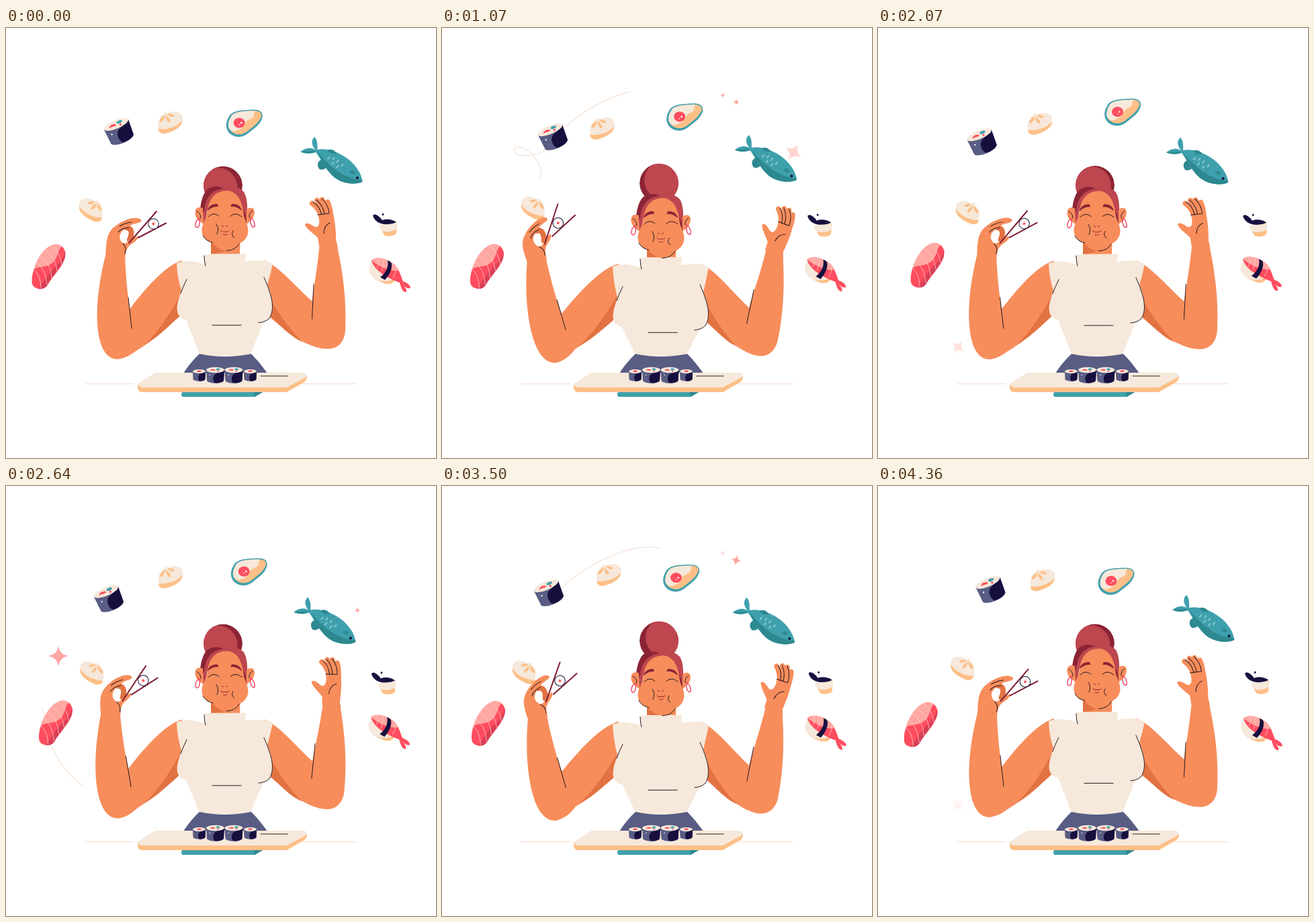
An HTML page that plays this animation: 640 by 640 pixels, repeating every 4.43 s.

```html
<!DOCTYPE html>
<html lang="en">
<head>
<meta charset="utf-8">
<title>Sushi time</title>
<style>
html, body { margin: 0; width: 100%; height: 100%; overflow: hidden; background: #fff; }
svg { display: block; width: 100vw; height: 100vh; }
.line { fill: none; stroke: #2a1a22; stroke-width: 1; stroke-linecap: round; }
.skin { fill: #f78d5b; }
.shade { fill: #e37242; }
.cream { fill: #f6e8da; }
.peach { fill: #fdbf87; }
.teal { fill: #3fa0ad; }
.deep { fill: #2d8890; }
.navy { fill: #17103f; }
.slate { fill: #595c83; }
.red { fill: #ff4d5f; }
.pink { fill: #ffa7a2; }
.hair { fill: #bd464f; }
.dark { fill: #8b2434; }
.stripe { fill: none; stroke: #ffc9c4; stroke-width: .8; }
.stick { fill: none; stroke: #7e1f33; stroke-width: 2; stroke-linecap: round; }
</style>
</head>
<body>
<svg viewBox="0 0 640 640">
  <defs>
    <g id="roll">
      <path class="slate" d="M-13.5,-8 L-12.5,8 C-9,13 9,13 12.5,8 L13.5,-8Z"/>
      <path class="navy" d="M13.5,-8 L12.5,8 C10,11 3,12 -1,11 C-4,8 -4,1 0,-2 C4,-4 9,-4 13.5,-8Z"/>
      <ellipse class="cream" cy="-8" rx="13.4" ry="4.2"/>
      <path class="red" d="M-8,-7 C-7,-10 -1,-10 0,-7.5 C-2,-6 -4,-8 -8,-7Z"/>
      <ellipse class="teal" cx="4" cy="-9" rx="3" ry="1.4"/>
      <circle class="red" cx="4" cy="-6.2" r="1.1"/>
      <circle cx="-8" cy="-.5" r=".8" fill="#fff"/>
    </g>
    <g id="mini">
      <path class="slate" d="M-9.5,-6 L-9,6 C-6,9.5 6,9.5 9,6 L9.5,-6Z"/>
      <path class="navy" d="M9.5,-6 L9,6 C7,8.5 3,9 0,8.5 C-2,5 -2,0 1,-2Z"/>
      <ellipse class="cream" cy="-6" rx="9.5" ry="3"/>
      <ellipse class="red" cy="-6.2" rx="3.2" ry="1.2"/>
    </g>
    <g id="dumpling">
      <path class="cream" d="M226,147 C225,137 229,129 234,128 L235,123.5 L240,126 C249,121 259,123 262,130 C264,142 251,152 240,155 C232,158 226,154 226,147Z"/>
      <path class="peach" d="M226,149 C238,151 255,146 262,136 C262,146 250,152 240,155 C232,158 226,155 226,149Z"/>
      <path class="peach" d="M236,128 C231,132 227,136 228,139 C233,139 236,134 236,128Z M237,129 C237,134 239,138 243,140 C246,137 242,132 237,129Z M239,127 C243,131 248,133 250,130 C248,127 243,126 239,127Z"/>
    </g>
    <path id="star" d="M0,-1 Q.13,-.13 1,0 Q.13,.13 0,1 Q-.13,.13 -1,0 Q-.13,-.13 0,-1Z"/>
    <clipPath id="bunEdge"><circle cx="323" cy="234" r="29"/></clipPath>
  </defs>

  <path id="trail" pathLength="680" fill="none" stroke="#f6e7dc" stroke-width="1.4"
    d="M117,448 C70,415 42,350 61,283 C66,268 72,259 79,253 C100,233 132,242 145,226 C152,214 144,198 132,186 C122,176 107,175 107,182 C107,192 135,193 152,183 C172,152 210,122 248,106 Q265,98 283,94 Q305,89 325,92 C347,94 370,103 384,117"/>

  <g id="salmon">
    <path class="red" d="M63,326 C75,318 90,324 87,341 C84,355 68,370 61,382 C56,391 41,390 38,381 C35,364 48,336 63,326Z"/>
    <path fill="#d93f56" d="M87,332 C90,348 70,366 61,382 C58,388 52,389 48,388 C55,378 62,366 70,358 C79,350 85,342 87,332Z"/>
    <path class="pink" d="M40,360 C46,340 58,325 70,322 C76,321 80,323 82,325 C74,332 78,348 60,354 C52,356 45,355 40,360Z"/>
    <path class="stripe" d="M40,359 Q51,368 51,388 M44,348 Q58,358 60,382 M50,339 Q66,349 67,372 M57,331 Q73,341 75,362 M66,324 Q80,334 82,352"/>
  </g>
  <g id="bunLow"><use href="#dumpling" transform="rotate(7,127,270) translate(371,130) scale(-1,1)"/></g>
  <g id="maki"><use href="#roll" transform="translate(169,154) rotate(-23) scale(1.45 1.5)"/></g>
  <g id="bunTop"><use href="#dumpling"/></g>
  <g id="egg">
    <path class="teal" d="M332,132 C336,123 350,122 365,121.500 C378,120.500 384,125 381.500,134 C378,145 368,150 360,157 C350,165 334,163 329,150 C327,143 329,137 332,132Z"/>
    <path class="peach" d="M335,132 C339,124 352,123.500 365,123 C377,122 382,126 380,132 C376,142 367,147 359,154 C350,161 337,159 332,149 C330,143 332,137 335,132Z"/>
    <path class="cream" d="M335,132 C339,124 352,123.500 371,123 C368,130 371,133 362,136 C354,140 356,148 347,151 C341,153 339,157 332,149 C330,143 332,137 335,132Z"/>
    <ellipse class="red" cx="347.500" cy="141" rx="8.500" ry="7.500"/>
    <circle cx="350.500" cy="141" r="1.300" fill="#fff"/><circle cx="347.500" cy="144" r=".8" fill="#fff"/>
  </g>
  <g id="fish">
    <path class="teal" d="M463,184 C455,177 452,168 459,162 C464,168 463,176 463,181 C475,178 495,184 510,196 C522,206 529,218 530,228 C520,234 500,232 488,222 C476,212 470,198 461,185 C452,188 443,187 438,184 C444,179 453,176 461,182Z"/>
    <path class="deep" d="M463,184 C480,206 505,226 530,226 L530,229 C520,234 500,232 488,222 C476,212 470,198 463,184Z M478,183 C480,179 488,180 492,187 L484,187Z M469,196 C463,198 462,205 466,210 C470,212 474,210 476,208Z M438,184 C446,183 454,183 461,183 C453,188 443,187 438,184Z M511,214 C514,210 519,212 520,217 C516,218 512,217 511,214Z"/>
    <path fill="none" stroke="#8cc9cd" stroke-width="1.800" d="M478,194 q3,1 3,-3 M485,195 q3,1 3,-3 M484,202 q3,1 3,-3 M491,199 q3,1 3,-3 M491,207 q3,1 3,-3 M498,205 q3,1 3,-3"/>
    <circle class="navy" cx="522.500" cy="223" r="2"/>
  </g>
  <g id="soy">
    <path class="peach" d="M556,296 L582,290 L581,306 C576,311 566,310 563,308Z"/>
    <path class="cream" d="M555,294 L581,287 L582,299 C574,304 566,304 559,302Z"/>
    <path class="navy" d="M546,279 C549,275 555,279 560,286 C566,283 577,285 581,289 C573,293 551,296 546,279Z M559.500,277 Q562,274 562.500,278 Q561,281 559.500,277Z"/>
  </g>
  <g id="shrimp">
    <path class="cream" d="M541,355 C538,368 552,379 565,380 C576,382 581,376 578,370 L545,346Z"/>
    <path class="peach" d="M552,374 C560,378 570,378 579,373 C578,381 570,382 563,380Z"/>
    <path class="red" d="M544,346 C551,339 567,343 578,352 C586,359 588,371 591,377 C597,379 602,383 602,387 C597,389 593,384 590,382 C594,385 597,390 596,393 C590,394 588,386 586,379 C572,374 548,362 544,346Z"/>
    <path class="pink" d="M544,346 C551,339 567,343 578,352 C581,355 583,358 584,361 C573,363 557,356 544,346Z"/>
    <path class="stripe" d="M553,343 Q556,351 552,357 M562,344 Q563,353 559,362 M581,356 Q581,365 576,372"/>
    <path class="navy" d="M568,346 C571,347 573,348 574,351 C575,361 569,369 564,375 L557,371 C565,365 570,356 568,346Z"/>
  </g>
  <g id="stars" class="pink"></g>

  <path stroke="#f9e9e0" stroke-width="2" d="M118,529.500H190M440,529.500H522"/>

  <g id="armL">
    <path class="skin" d="M262,346 C238,353 210,384 182,421 L150,455 L165,493 C180,491 198,478 214,467 L268,418Z"/>
    <path class="shade" d="M266,385 C250,415 232,447 207,471 C224,462 240,446 264,424Z"/>
    <g id="foreL">
      <path class="skin" d="M149,335 C141,365 134,405 136,440 C138,473 148,493 166,493 C180,491 188,485 196,478 L187,430 C181,405 178,365 177,335Z"/>
      <path class="line" d="M182,401L187,447"/>
      <g id="handL">
        <path fill="none" stroke="#e37242" stroke-width="8" stroke-linecap="round" d="M179,297 C188,298 188,306 184,315"/>
        <path class="skin" d="M148.500,340 C149,318 150,306 160,297 C170,288 186,281 196,283 C203,284 203,289 197,290 C188,292 185,293 179,298 C170,303 167,310 171,317 C174,322 179,321 183,317 C188,314 193,310 197,310 C197,315 191,319 186,322 C181,326 178,331 177.500,341 C168,345 156,345 148.500,340Z"/>
        <path class="line" d="M169,295Q177,290 187,289M167,304Q173,297 183,297M174,321Q180,326 177,336"/>
        <path class="stick" d="M183,320L224,273"/>
        <path id="stick" class="stick" d="M197,312L238,290.500"/>
        <g id="bite">
          <circle cx="219.500" cy="291.500" r="7.800" fill="#fffaf5" stroke="#17103f" stroke-width="1"/>
          <circle class="red" cx="219.500" cy="291.500" r="1.900"/>
        </g>
      </g>
    </g>
  </g>
  <g id="armR">
    <path class="skin" d="M385,346 C408,356 432,386 456,407 L490,455 L475,477 C462,477 445,469 430,461 L380,420Z"/>
    <path class="shade" d="M385,388 C402,420 420,446 441,467 C424,460 408,443 388,424Z"/>
    <g id="foreR">
      <path class="skin" d="M467,318 C464,355 458,385 455,410 L445,468 C455,473 466,477 476,477.500 C495,479 504,466 505,450 C507,405 502,365 491,316Z"/>
      <path class="shade" d="M489,308 L494,328 L489,318Z"/>
      <path class="line" d="M458,381L455.500,433"/>
      <g id="handR">
        <path class="skin" d="M466,324 L464,312 C458,306 447,299 445,293 C446,289 451,291 455,293 C460,297 465,298 466,291 C467,286 465,280 463,274 L482,264 C488,276 491,290 491.500,322 C483,326 473,326 466,324Z"/>
        <path fill="none" stroke="#f78d5b" stroke-width="7.500" stroke-linecap="round" stroke-linejoin="round" d="M472,286Q466,268 455.500,261M474,282Q470,264 463,256.500M478,280Q475,264 470.500,255.500M484,284Q483,268 478.500,259"/>
        <path class="line" d="M457,259Q466,264 470,278M462,256Q472,264 474,277M470,254Q479,262 481,275M464,278Q472,277 481,276M473,306Q473,294 482,290"/>
      </g>
    </g>
  </g>

  <path id="neck" class="skin"/>
  <path id="neckShade" class="shade"/>
  <path id="torso" class="cream"/>
  <g id="bun" clip-path="url(#bunEdge)">
    <circle class="dark" cx="323" cy="234" r="29"/>
    <circle id="bunLight" class="hair" cx="323" cy="234" r="29"/>
  </g>
  <g id="head">
    <path class="hair" d="M289,284 C288,262 293,247 301,241 C318,232 345,233 354,244 C360,254 360,270 358,298 C352,290 352,280 350,270 L300,270 L296,292Z"/>
    <path class="dark" d="M289,282 C288,262 293,246 300,240 C308,235 317,235 324,239 C306,240 296,254 295,272 Z M349,268 C355,270 358,280 358,298 C354,292 352,280 349,268Z"/>
    <path class="skin" d="M293,268 C281,263 278,276 286,286 L294,292Z M358,270 C369,262 374,274 366,285 L358,292Z"/>
    <path class="skin" d="M300,272 C302,251 314,242 330,242 C345,244 352,258 354,280 C357,289 362,297 360,306 C358,315 351,319 347,321 C343,328 337,331 328,331.500 C318,331 311,324 306,319 C297,318 291,309 291.500,300 C292,290 299,284 300,272Z"/>
    <path class="line" d="M284,273Q290,275 290,283M367,272Q361,275 362,282"/>
    <path fill="none" stroke="#f04463" stroke-width="1.400" d="M288,283C282,286 280,295 284,297C288,297 289,290 288,283M364,282C369,285 372,294 369,296.500C365,296 363,290 364,282"/>
    <path class="dark" d="M300,272 C301,265 308,261 315,262 L316,266 C310,265 305,268 300,272Z M351,272 C350,265 343,261 336,262 L334,266 C341,265 346,268 351,272Z"/>
    <path class="line" d="M301,281Q309,273 317,280M334,280Q342,273 351,281M313,292Q318,299 314,307M338,302Q334,308 340,312M293,309Q297,317 308,319.500M328,331.500Q342,331 347,321"/>
    <path fill="none" stroke="#a33438" stroke-width="1.100" stroke-linecap="round" d="M321.500,294q1,1.500 2,1M329.500,294q-1,1.500 -2,1M320,301.500Q322,304 326,303Q330,304 332,301.500M323,307Q326,308.500 329,307"/>
  </g>
  <path id="collar" class="line"/>
  <path id="folds" class="line" d="M269,374Q263,386 260,395M384,371Q390,384 394,398C398,413 397,424 392,432Q386,438 376,438.500M307,442.300H350"/>

  <path class="slate" d="M288,485 Q325,493 365,485 Q378,498 389,514 H264 Q274,498 288,485Z"/>
  <path class="teal" d="M264,541 H383 L370,549 H264 C260,549 260,542 264,541Z"/>
  <path class="deep" d="M369,541 H384 L370,549Z"/>
  <path class="peach" d="M196,530 V536 Q197,542 203,542 H418 L444,527 Q448,524 448,518Z"/>
  <path class="cream" d="M222,513 H443 Q450,515 446,520 L418,535 H202 Q195,533 197,529Z"/>
  <path class="line" d="M379,518H419"/>
  <use href="#mini" x="287.500" y="517"/>
  <use href="#roll" x="311.500" y="517"/>
  <use href="#roll" x="339" y="517"/>
  <use href="#mini" x="363.500" y="517"/>
</svg>
<script>
const LOOP = 4430, BEAT = LOOP / 2;
const $ = id => document.getElementById(id);
const move = (id, value) => $(id).setAttribute('transform', value);
const wave = (t, peak, period = LOOP) => Math.cos(2 * Math.PI * (t - peak) / period);

// Drift per item: x centre, x swing, x peak time, then the same for y
const drift = {
  salmon: [6.3, 5.5, 2415, -1.1, 1.5, 450],
  bunLow: [2, 7, 1400, 3.5, 5.5, 3000],
  maki: [-7.5, 8, 350, 8.3, 7.8, 2150],
  bunTop: [-.7, 5, 3500, 1, 8.8, 1100],
  egg: [4.2, 5, 1900, -8, 8.3, 4300],
  fish: [-4.5, 5.3, 280, .9, 3.6, 3150],
  soy: [-1.4, 1.5, 4115, .4, .5, 1600],
  shrimp: [-.5, .5, 4200, -1, 1, 4250]
};

// Sparkles: x, y, radius, start, duration, spin
const sparks = [
  [78, 253, 22, 130, 620, 0],
  [523, 185, 15.5, 350, 900, 40],
  [418, 100, 5, 600, 820, 30],
  [438, 110.5, 12.5, 915, 990, 35],
  [119, 475, 12, 1330, 860, 45]
];
const starNodes = sparks.map(() => {
  const node = document.createElementNS('http://www.w3.org/2000/svg', 'use');
  node.setAttribute('href', '#star');
  return $('stars').appendChild(node);
});

// Distance along the trail by time
const trailTail = [[500, 0], [925, 220], [1070, 292], [1575, 614], [1700, 680]];
const trailHead = [[220, 0], [500, 185], [925, 534], [1070, 571], [1575, 680]];

function along(keys, t) {
  if (t <= keys[0][0]) return keys[0][1];
  const i = keys.findIndex(k => k[0] > t);
  if (i < 0) return keys[keys.length - 1][1];
  const [t0, v0] = keys[i - 1], [t1, v1] = keys[i];
  return v0 + (v1 - v0) * (t - t0) / (t1 - t0);
}

function drawBody(t) {
  const p = (1 - wave(t, 0, BEAT)) / 2, sway = wave(t, 200, BEAT);
  const top = 5 * p, low = 11 * p, y = n => n + top, c = n => n + low;
  move('armL', `translate(0,${top}) rotate(${2.2 * p},265,370)`);
  move('foreL', `rotate(${-12.5 * p},187,447)`);
  move('handL', `rotate(${-12.7 * p},163,336)`);
  move('stick', `rotate(${8 * p},185,319)`);
  move('bite', `translate(${-6 * p},${7.5 * p})`);
  move('armR', `translate(0,${top}) rotate(${1.7 * p},385,370)`);
  move('foreR', `rotate(${7.3 * p},455,433)`);
  move('handR', `rotate(${18.5 * p},478,320)`);
  move('head', `translate(0,${low})`);
  move('folds', `translate(0,${low})`);
  move('bun', `translate(0,${-1.3 + 2.3 * sway})`);
  move('bunLight', `translate(${-9 * sway},${4 * sway - 1})`);
  $('torso').setAttribute('d', `M295,${y(337)} L357,${y(336)} L356,${y(348)}
    C370,${y(345)} 388,${y(345)} 397,${y(351)} Q394,${y(366)} 389,${c(382)}
    C398,${c(402)} 399,${c(424)} 392,${c(432)} Q388,${c(436)} 383,${c(438)}
    L363,488 L289,488 L268,${c(434)} C257,${c(432)} 252,${c(424)} 256,${c(407)}
    L261,${c(390)} Q255,${y(373)} 254,${y(350)} C268,${y(344)} 285,${y(348)} 296,${y(352)}Z`);
  $('collar').setAttribute('d', `M295,${y(339)}Q295,${y(348)} 297,${y(354)}`);
  $('neck').setAttribute('d', `M305,${c(300)} H349 L348,${y(336.5)} H305Z`);
  $('neckShade').setAttribute('d',
    `M305,${c(317)} Q313,${c(327)} 326,${c(331)} Q318,${y(336)} 305,${y(336)}Z`);
}

function drawSparks(t) {
  sparks.forEach(([x, y, r, start, span, spin], i) => {
    const u = (t - start) / span, live = u > 0 && u < 1;
    starNodes[i].setAttribute('opacity', live ? Math.min(1, 2.5 * (1 - u)) : 0);
    if (live) starNodes[i].setAttribute('transform',
      `translate(${x},${y}) rotate(${spin * u}) scale(${r * Math.sqrt(u)})`);
  });
}

function drawTrail(t) {
  const tail = along(trailTail, t), length = along(trailHead, t) - tail;
  const style = $('trail').style;
  style.visibility = length > .5 ? 'visible' : 'hidden';
  style.strokeDasharray = `${length} 2000`;
  style.strokeDashoffset = -tail;
}

function frame(now) {
  const t = now % LOOP;
  for (const [id, [x, ax, px, y, ay, py]] of Object.entries(drift))
    move(id, `translate(${x + ax * wave(t, px)},${y + ay * wave(t, py)})`);
  drawBody(t);
  drawSparks(t % BEAT);
  drawTrail(t % BEAT);
  requestAnimationFrame(frame);
}
frame(0);
</script>
</body>
</html>
```
